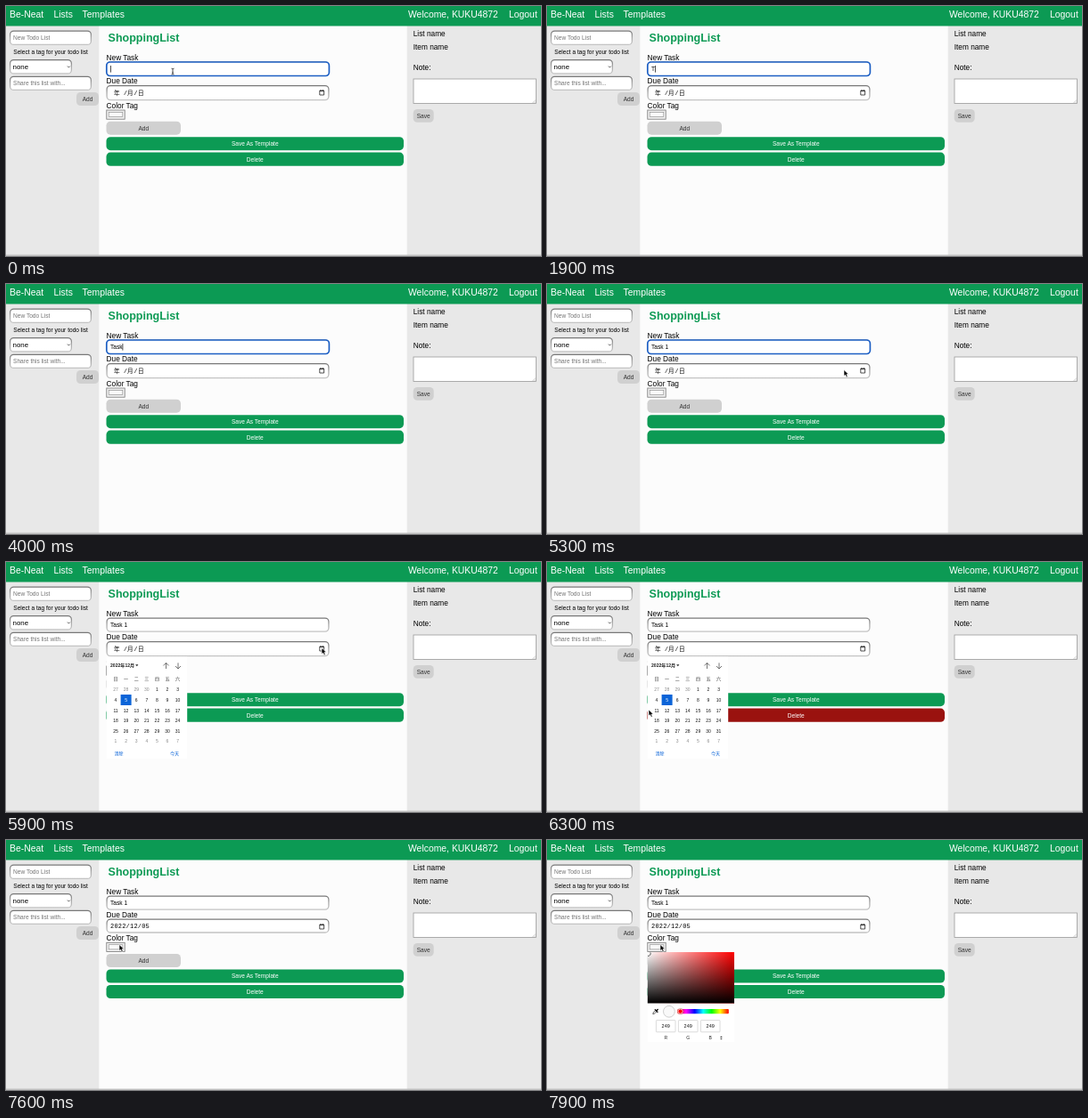
These frames come from a looping animation (600 px wide and 281 px high, 8000 ms). An HTML page:

```html
<!DOCTYPE html>
<html lang="en">
<head>
<meta charset="utf-8">
<title>Todo list</title>
<style>
html, body { margin: 0; width: 100%; height: 100%; overflow: hidden; background: #fff; }
svg { display: block; width: 100%; height: 100%; }
text { font-family: "Liberation Sans", Arial, "Noto Sans CJK JP", "Noto Sans CJK SC", sans-serif; white-space: pre; }
.mono { font-family: "Liberation Mono", "Noto Sans CJK JP", monospace; }
</style>
</head>
<body>
<svg id="stage" viewBox="0 0 600 281" xmlns="http://www.w3.org/2000/svg"></svg>
<script>
const LOOP = 8000, STEP = 100;
const GREEN = '#0c9a54', DARK_GREEN = '#047a3f', RED = '#9a120f', BLUE = '#0b64d8';

const rect = (x, y, w, h, fill, r = 0, extra = '') =>
  `<rect x="${x}" y="${y}" width="${w}" height="${h}" rx="${r}" fill="${fill}" ${extra}/>`;
const text = (s, x, y, size, fill = '#000', extra = '') =>
  `<text x="${x}" y="${y}" font-size="${size}" fill="${fill}" ${extra}>${s}</text>`;
const mid = (s, x, y, size, fill, extra = '') =>
  text(s, x, y, size, fill, 'text-anchor="middle" ' + extra);
const field = (x, y, w, h, r = 4) =>
  rect(x + .6, y + .6, w - 1.2, h - 1.2, '#fff', r, 'stroke="url(#inset)" stroke-width="1.3"');
const button = (s, x, y, w, h, fill, ink, id = '') =>
  rect(x, y, w, h, fill, 4.6, id && `id="${id}"`) + mid(s, x + w / 2, y + h / 2 + 2.3, 6.6, ink);

function chrome() {
  return rect(0, 0, 600, 281, '#fcfcfc') +
    rect(0, 22, 104.3, 258, '#e8e8e8') + rect(449.7, 22, 150.3, 258, '#e8e8e8') +
    rect(0, 0, 600, 22.5, GREEN) + rect(0, 279.7, 600, 1, '#a9a9a9') +
    text('Be-Neat', 4, 13.2, 10.4, '#fff') + text('Lists', 53.5, 13.2, 10.4, '#fff') +
    text('Templates', 85.5, 13.2, 10.4, '#fff') +
    text('Welcome, KUKU4872', 451, 13.2, 10.4, '#fff') + text('Logout', 564, 13.2, 10.4, '#fff');
}

function sidebars() {
  return field(4, 27.5, 92, 16.5) + text('New Todo List', 8, 38.3, 6.6, '#757575') +
    text('Select a tag for your todo list', 8.3, 54.2, 6.6) +
    field(4, 60, 70, 16.5) + text('none', 7.5, 70.8, 7.9) +
    '<path d="M69 67.6l1.4 1.5 1.4-1.5" fill="none" stroke="#333" stroke-width=".8"/>' +
    field(4, 78.8, 92, 16.2) + text('Share this list with...', 8, 89.2, 6.6, '#757575') +
    button('Add', 79, 97, 25, 15, '#d0d0d0', '#333') +
    text('List name', 456.7, 34, 8.3) + text('Item name', 456.7, 48.8, 8.3) +
    text('Note:', 456.7, 71.6, 8.3) +
    rect(457, 82, 137.5, 27.5, '#fff', 0, 'stroke="#999" stroke-width=".8"') +
    '<path d="M594 105.5l-3.5 3.5m3.5-1.5l-1.5 1.5" stroke="#999" stroke-width=".5"/>' +
    button('Save', 456.7, 116, 23, 14.8, '#d0d0d0', '#333');
}

function form() {
  return text('ShoppingList', 114.6, 39.7, 12.5, GREEN, 'font-weight="bold"') +
    text('New Task', 112.6, 61, 8.3) + field(112.5, 62.5, 250, 16.2) +
    rect(112.8, 63, 249.6, 15.5, '#fff', 4, 'id="ring" stroke="#1d5fc4" stroke-width="1.7"') +
    text('', 117, 73, 6.6, '#000', 'id="task"') + rect(0, 67, .7, 7.6, '#000', 0, 'id="caret"') +
    text('Due Date', 112.6, 86.7, 8.3) +
    `<g id="emptyDate">${field(112.5, 89, 250, 17.2)}` +
    text('年', 121, 99.8, 6.6) + text('/', 132, 99.8, 6.6, '#000', 'class="mono"') +
    text('月', 136, 99.8, 6.6) + text('/', 143.6, 99.8, 6.6, '#000', 'class="mono"') +
    text('日', 148, 99.8, 6.6) + '</g>' +
    `<g id="setDate">${field(112.5, 88.6, 250, 16)}` +
    text('2022/12/05', 117, 99.2, 7, '#000', 'class="mono" letter-spacing=".2"') + '</g>' +
    '<path d="M351.8 95.2h4.8v4.8h-4.8zM351.8 95.6h4.8M353 94v1.2M355.4 94v1.2" fill="none" stroke="#222" stroke-width=".8"/>' +
    '<g id="lower">' + text('Color Tag', 112.6, 114.8, 8.3) +
    rect(112.8, 117, 20.4, 10.2, '#efefef', 0, 'stroke="#777" stroke-width=".8"') +
    rect(115.2, 119.4, 15.6, 5.2, '#f9f9f9', 0, 'stroke="#888" stroke-width=".6"') +
    button('Add', 112.5, 129.7, 83.5, 15, '#d0d0d0', '#333') +
    button('Save As Template', 112.5, 147.2, 333.5, 15, GREEN, '#fff', 'save') +
    button('Delete', 112.5, 164.6, 333.5, 15.2, GREEN, '#fff', 'del') + '</g>';
}

function calendar() {
  const col = i => 123 + 11.6 * i, row = i => 145.4 + 11.6 * i;
  let s = rect(113, 106.5, 90.2, 115, '#fff') +
    text('2022年12月', 117, 118, 5.1, '#222', 'font-weight="bold"') +
    '<path d="M145.2 115.2h3.2l-1.6 2z" fill="#222"/>' +
    '<path d="M179.5 120v-6.6m-3 3l3-3 3 3M193 113.4v6.6m-3-3l3 3 3-3" fill="none" stroke="#555" stroke-width=".8"/>' +
    rect(128.6, 149, 12, 12, BLUE);
  [...'日一二三四五六'].forEach((d, i) => s += mid(d, col(i), 133, 5, '#333'));
  for (let i = 0; i < 42; i++) {
    const n = i - 3, inside = n > 0 && n < 32;
    const day = n < 1 ? n + 30 : n > 31 ? n - 31 : n;
    s += mid(day, col(i % 7), row(Math.floor(i / 7)), 5,
      n === 5 ? '#fff' : inside ? '#111' : '#8a8a8a');
  }
  return s + mid('清除', 126.6, 217, 5, BLUE) + mid('今天', 189, 217, 5, BLUE);
}

function picker() {
  let s = rect(112.8, 126, 97.2, 101, '#fff') +
    rect(112.8, 126, 97.2, 57.5, 'url(#sat)') + rect(112.8, 126, 97.2, 57.5, 'url(#val)') +
    '<path d="M113 130.3a2.7 2.7 0 0 0 2.9-3.9" fill="none" stroke="#fff" stroke-width="1.8"/>' +
    '<path d="M113 130.3a2.7 2.7 0 0 0 2.9-3.9" fill="none" stroke="#222" stroke-width=".8"/>' +
    '<path d="M118.8 195.6l.4-1.6 2.6-2.6 1.2 1.2-2.6 2.6z" fill="#fff" stroke="#222" stroke-width=".7"/>' +
    '<path d="M121.3 190.7l2.6 2.6M122.7 192l1.5-1.5" stroke="#111" stroke-width="1.5" stroke-linecap="round"/>' +
    '<circle cx="136.9" cy="192.8" r="6.4" fill="#f9f9f9" stroke="#bbb" stroke-width=".7"/>' +
    rect(146.5, 190, 57.3, 5.2, 'url(#hue)', 1) +
    '<circle cx="149.6" cy="192.6" r="2.7" fill="#f00" stroke="#fff" stroke-width=".9"/>' +
    '<circle cx="149.6" cy="192.6" r="3.2" fill="none" stroke="#a22" stroke-width=".4"/>';
  [...'RGB'].forEach((c, i) => {
    const x = 133.2 + 25 * i;
    s += rect(x - 10.8, 202.6, 21.6, 13.2, '#fff', .6, 'stroke="#ccc" stroke-width=".7"') +
      mid('249', x, 211.2, 5.5, '#111') + mid(c, x, 224.4, 5, '#222');
  });
  return s + '<path d="M194 221.9l1.4-1.4 1.4 1.4zM194 222.9l1.4 1.4 1.4-1.4z" fill="#333"/>';
}

const cursors =
  '<g id="arrow"><path d="M0 0v7l1.6-1.4 1.2 2.7 1.4-.6-1.2-2.6h2.2z" fill="#000" stroke="#fff" stroke-width=".6"/></g>' +
  '<g id="beam"><path d="M-1.5-3.3q1.5 0 1.5 1v4.8q0 1-1.5 1M1.5-3.3q-1.5 0-1.5 1M0 2.5q0 1 1.5 1M-.7 1.3h1.4" fill="none" stroke="#222" stroke-width=".8"/></g>' +
  '<g id="hand"><path d="M-.6.3q.6-.7 1.2 0v2.5l2.6.6q.8.3.6 1.2l-.7 3h-3.4l-2.2-3q0-.9 1-.6l.9.8z" fill="#fff" stroke="#111" stroke-width=".7"/></g>';

const hues = ['#f00', '#f0f', '#00f', '#0ff', '#0f0', '#ff0', '#f00'];
const stops = list => list.map(([o, c, a = 1]) =>
  `<stop offset="${o}" stop-color="${c}" stop-opacity="${a}"/>`).join('');
const stage = document.getElementById('stage');
stage.innerHTML = `<defs>
  <linearGradient id="inset" x2="0" y2="1">${stops([[0, '#777'], [.5, '#aaa'], [1, '#c4c4c4']])}</linearGradient>
  <linearGradient id="sat">${stops([[0, '#fff'], [1, '#f00']])}</linearGradient>
  <linearGradient id="val" x2="0" y2="1">${stops([[0, '#000', 0], [1, '#000']])}</linearGradient>
  <linearGradient id="hue">${stops(hues.map((c, i) => [i / 6, c]))}</linearGradient>
  </defs>` + chrome() + sidebars() + form() +
  `<g id="calendar">${calendar()}</g><g id="picker">${picker()}</g>${cursors}`;

const el = id => document.getElementById(id);
const show = (id, on) => el(id).setAttribute('display', on ? 'inline' : 'none');

// [time, typed text]; the caret blink restarts at each key press
const keys = [[-400, ''], [1800, 'T'], [2200, 'Ta'], [2600, 'Tas'], [3000, 'Task'],
  [4300, 'Task '], [4600, 'Task 1']];
// [time, x, y] of the pointer tip
const path = [[0, 187, 73.5], [5000, 187, 73.5], [5300, 333, 96.5], [5600, 354, 96.5], [5900, 354, 96.5],
  [6200, 114, 166], [6400, 114, 166], [6700, 134, 155.5], [7000, 135.5, 156], [7500, 127, 117.5], [8000, 127, 117.5]];

function pointer(t) {
  const i = path.findIndex(p => p[0] > t);
  const [t0, x0, y0] = path[i - 1], [t1, x1, y1] = path[i];
  const u = (t - t0) / (t1 - t0), e = u * u * (3 - 2 * u);
  return [x0 + (x1 - x0) * e, y0 + (y1 - y0) * e];
}

function draw(t) {
  const [keyTime, typed] = keys.filter(k => k[0] <= t).pop();
  const focused = t < 5800, dated = t >= 6800, open = t >= 5900 && !dated;
  const task = el('task');
  task.textContent = typed;
  show('ring', focused);
  show('caret', focused && Math.floor((t - keyTime) / 500) % 2 === 0);
  el('caret').setAttribute('x', 117 + (typed ? task.getComputedTextLength() : 0));

  show('emptyDate', !dated);
  show('setDate', dated);
  el('lower').setAttribute('transform', `translate(0 ${dated ? -1.7 : 0})`);
  show('calendar', open);
  show('picker', t >= 7700);

  const [x, y] = pointer(t);
  const overSave = dated && y > 145.5;
  el('save').setAttribute('fill', overSave ? DARK_GREEN : GREEN);
  el('del').setAttribute('fill', open && t >= 6100 ? RED : GREEN);

  const moving = t >= 5000;
  const kind = y < 79 ? 'beam' : dated && y > 128 ? 'hand' : 'arrow';
  for (const id of ['arrow', 'beam', 'hand']) {
    show(id, id === kind && (moving || t < 1800));
    el(id).setAttribute('transform', `translate(${x} ${y})`);
  }
}

const start = performance.now();
function tick() {
  const t = (performance.now() - start) % LOOP;
  draw(Math.floor(t / STEP) * STEP);
  requestAnimationFrame(tick);
}
tick();
</script>
</body>
</html>
```
